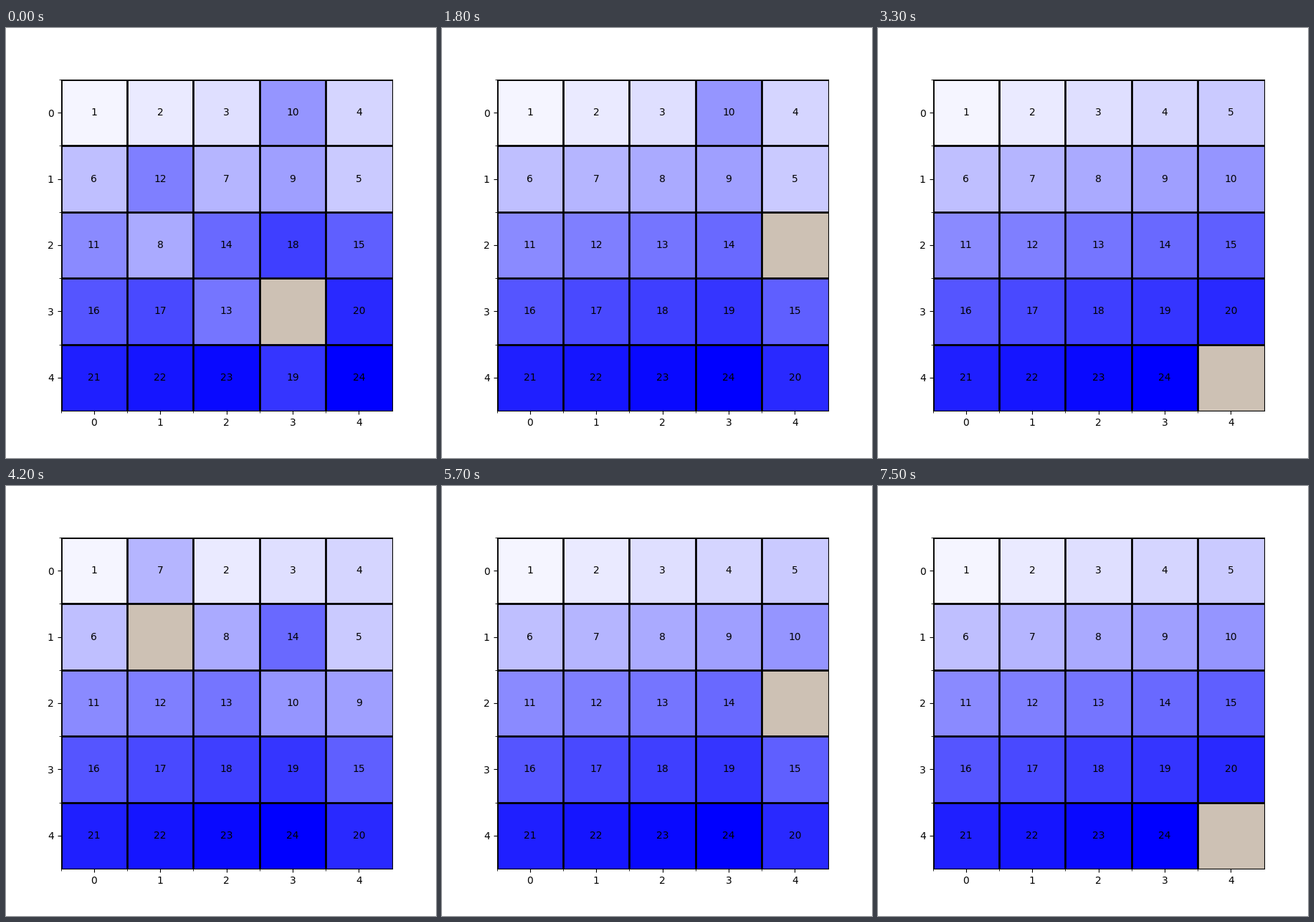
Write a matplotlib script that moves like this. It is 600 px wide and 600 px high and loops after 8.1 s.

```python
import numpy as np
import matplotlib.pyplot as plt
from matplotlib.animation import FuncAnimation
from matplotlib.colors import LinearSegmentedColormap

SIZE = 5
STEP_MS = 150
HOLD = 3  # extra steps on each solved board
STEPS = {"U": (-1, 0), "D": (1, 0), "L": (0, -1), "R": (0, 1)}

# Paths of the empty cell, each ending on the solved board
SOLUTIONS = [
    "ULLURDDRDRUULUURDLDRDD",
    "URURRRDDLURDDD",
    "UULDDR",
]

EMPTY = (205 / 255, 193 / 255, 180 / 255, 1)
shades = LinearSegmentedColormap.from_list("tiles", ["white", "blue"])


def play(path):
    """Boards from scrambled to solved, found by undoing the path."""
    board = np.roll(np.arange(SIZE * SIZE), -1).reshape(SIZE, SIZE)
    row = col = SIZE - 1
    boards = [board]
    for move in reversed(path):
        dr, dc = STEPS[move]
        r, c = row - dr, col - dc
        board = board.copy()
        board[row, col], board[r, c] = board[r, c], 0
        row, col = r, c
        boards.append(board)
    return boards[::-1]


def paint(board):
    rgba = shades(board / (SIZE * SIZE - 1))
    rgba[board == 0] = EMPTY
    return rgba


boards = []
for path in SOLUTIONS:
    run = play(path)
    boards += run + [run[-1]] * HOLD

fig, ax = plt.subplots(figsize=(6, 6), dpi=100)
image = ax.imshow(paint(boards[0]))
ax.set_xticks(range(SIZE))
ax.set_yticks(range(SIZE))
edges = np.arange(SIZE) - 0.5
ax.set_xticks(edges, minor=True)
ax.set_yticks(edges, minor=True)
ax.grid(which="minor", color="black", linewidth=2)

labels = [
    ax.text(c, r, "", ha="center", va="center", color="black")
    for r in range(SIZE)
    for c in range(SIZE)
]


def update(i):
    image.set_data(paint(boards[i]))
    for label, n in zip(labels, boards[i].flat):
        label.set_text(str(n) if n else "")
    return [image, *labels]


anim = FuncAnimation(fig, update, frames=len(boards), interval=STEP_MS,
                     repeat=True, repeat_delay=0)
plt.show()
```
